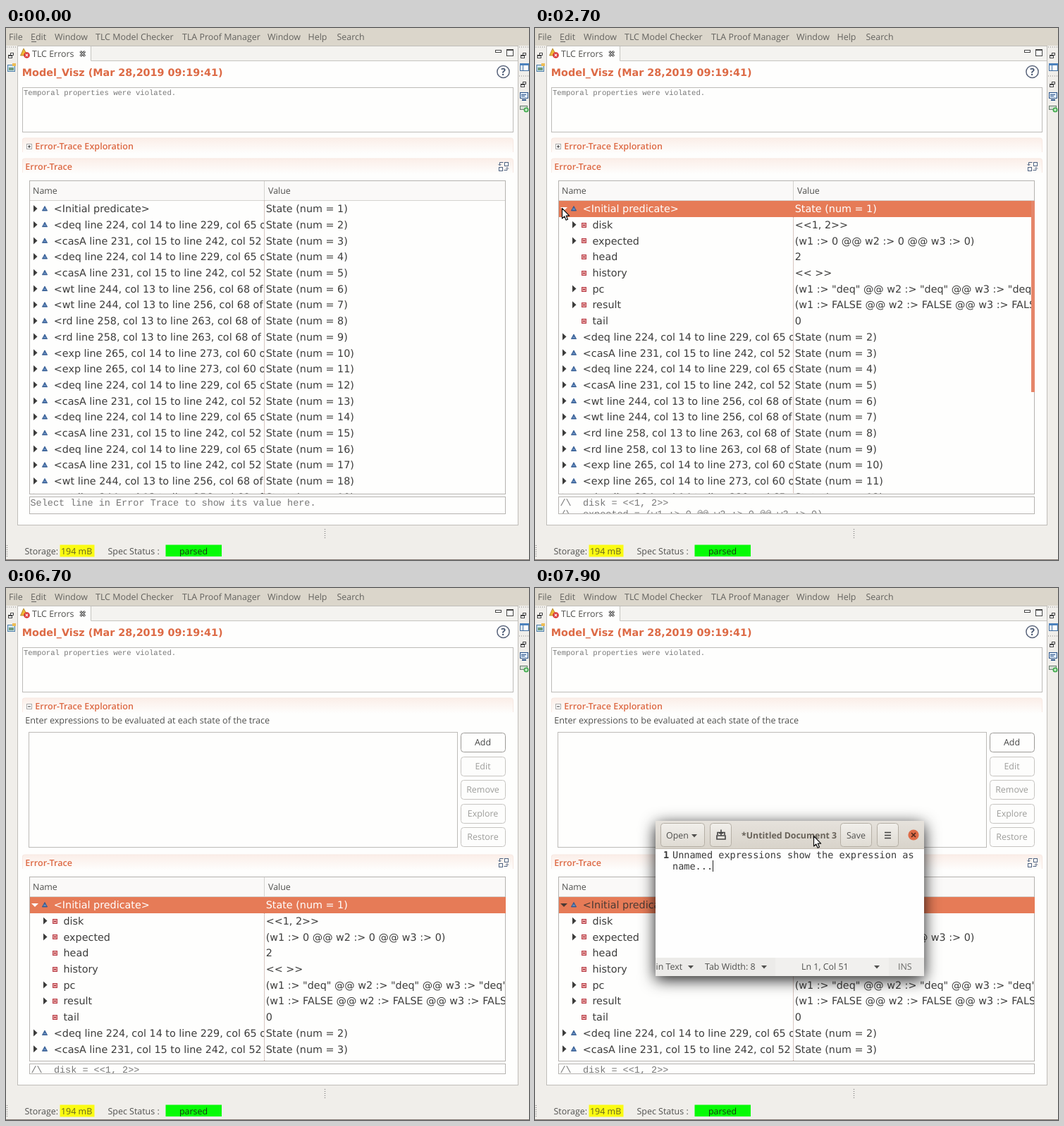
Recreate the animation shown at these times as an HTML page. Size 742 by 754 pixels, loop 8 s.

```html
<!DOCTYPE html>
<html lang="en">
<head>
<meta charset="utf-8">
<title>Error trace</title>
<style>
html, body { margin: 0; width: 742px; height: 754px; overflow: hidden; background: #f0eeea; }
svg { display: block; }
text { text-rendering: geometricPrecision; white-space: pre; }
.ui { font: 12.45px "Open Sans", "Noto Sans", sans-serif; fill: #50504e; }
.head { font-size: 12.6px; font-weight: 600; }
.tree { font: 14.35px "DejaVu Sans", sans-serif; fill: #3c3c3b; }
.mono { font: 13.5px "Liberation Mono", monospace; fill: #777; }
.doc { font: 13.55px "DejaVu Sans Mono", monospace; fill: #3a3a3a; }
.bold { font-weight: 700; }
</style>
</head>
<body>
<svg id="stage" width="742" height="754" viewBox="0 0 742 754">
  <defs>
    <linearGradient id="band" x2="0" y2="1"><stop stop-color="#fbeee8"/><stop offset="1" stop-color="#fefefd"/></linearGradient>
    <linearGradient id="bar" x2="0" y2="1"><stop stop-color="#e6e2dc"/><stop offset="1" stop-color="#d8d3ca"/></linearGradient>
    <linearGradient id="btn" x2="0" y2="1"><stop stop-color="#f1efeb"/><stop offset="1" stop-color="#dfdbd3"/></linearGradient>
    <filter id="shadow" x="-20%" y="-30%" width="140%" height="160%">
      <feDropShadow dx="0" dy="5" stdDeviation="11" flood-color="#000" flood-opacity=".9"/>
    </filter>
    <clipPath id="names"><rect x="34" y="200" width="332" height="500"/></clipPath>
    <clipPath id="values"><rect x="366" y="200" width="342" height="500"/></clipPath>
    <clipPath id="pane"><rect x="0" y="0" width="381" height="220"/></clipPath>
  </defs>
  <g id="base"></g>
  <g id="scene"></g>
</svg>
<script>
const LOOP = 8000, STEP = 100, ROW = 22.7;
const RED = '#dd6a45', SEL = '#e67b57', DARK = '#3c3c3b';

const esc = s => s.replace(/&/g, '&amp;').replace(/</g, '&lt;');
const text = (x, y, s, cls = 'ui', more = '') => `<text x="${x}" y="${y}" class="${cls}" ${more}>${esc(s)}</text>`;
const rect = (x, y, w, h, fill, more = '') => `<rect x="${x}" y="${y}" width="${w}" height="${h}" fill="${fill}" ${more}/>`;
const frame = (x, y, w, h, fill, line, r = 0) => rect(x + .5, y + .5, w - 1, h - 1, fill, `stroke="${line}" rx="${r}"`);
const path = (d, fill, more = '') => `<path d="${d}" fill="${fill}" ${more}/>`;
const line = (d, color, w = 1, more = '') => path(d, 'none', `stroke="${color}" stroke-width="${w}" ${more}`);
const at = (x, y, s) => `<g transform="translate(${x} ${y})">${s}</g>`;
const tint = c => `style="fill:${c}"`;
const mid = 'text-anchor="middle"';
const down = (x, y) => path(`M${x - 4} ${y - 2}h8l-4 4.5z`, '#50504e');

function restore(x, y) {
  return at(x, y, frame(-1, -4, 5, 4, '#fff', '#444') + frame(-4, -1, 6, 5, '#fff', '#444') + rect(-4, -1, 6, 2, '#444'));
}

function chrome() {
  const menu = [[4, 'File'], [35, 'Edit'], [69, 'Window'], [127, 'TLC Model Checker'],
    [250, 'TLA Proof Manager'], [371, 'Window'], [428.5, 'Help'], [469.5, 'Search']];
  const dots = 'stroke-dasharray="1 2"';
  return rect(0, 0, 742, 754, '#f0eeea') + rect(0, 0, 742, 25, '#dbd6cb')
    + menu.map(([x, s]) => text(x, 17, s, 'ui', tint('#63625e'))).join('')
    + line('M36 19.5h7', '#63625e')
    + frame(16, 25, 711, 680, '#fefefd', '#bfbdb9')
    + rect(121, 26, 605, 20, '#f4f3f0') + line('M120.5 26v20.5H726', '#c6c4c0')
    // tab
    + path('M25 29l5.5 10h-10z', '#f0b93a', 'stroke="#a87a1c" stroke-width=".8"')
    + '<circle cx="29.5" cy="38.5" r="4.3" fill="#d83232"/>' + line('M27.7 36.7l3.6 3.6m0-3.6l-3.6 3.6', '#fff', 1.2)
    + text(37, 40.5, 'TLC Errors')
    + line('M105.5 33l6.5 7m0-7l-6.5 7', '#444', 3.2) + line('M105.5 33l6.5 7m0-7l-6.5 7', '#fff', 1)
    + frame(694, 31, 9, 4, '#fff', '#444') + frame(710, 30, 10, 10, '#fff', '#444') + rect(710, 30, 10, 2, '#444')
    // view heading
    + text(22.8, 68, 'Model_Visz (Mar 28,2019 09:19:41)', 'tree bold', tint(RED))
    + '<circle cx="705.5" cy="62" r="8.6" fill="#fff" stroke="#59647a" stroke-width="1.5"/>'
    + text(705.5, 66.8, '?', 'ui bold', `${mid} style="fill:#44546f;font-size:14px"`)
    + frame(23, 84, 697, 64, '#fefefd', '#bdbbb8')
    + text(25, 95, 'Temporal properties were violated.', 'mono', 'style="font-size:10.6px"')
    // side strips
    + line('M1 27h14M728 27h14M728 68h14', '#888', 1, dots)
    + restore(7, 39) + restore(734, 39) + restore(734, 80)
    + frame(2, 52, 11, 10, '#cfe3f2', '#4d7fa8') + rect(4, 56, 7, 4, '#6d9a7c') + path('M9 50h5v4h-5z', '#edbd55')
    + frame(729, 50, 13, 11, '#fff', '#3f6ea3') + rect(729, 50, 13, 3, '#4c82bd') + line('M733.5 53v8', '#3f6ea3')
    + frame(729, 91, 12, 9, '#dce8f5', '#2f578c') + line('M731 94.5h7m-7 2h5', '#2f578c') + rect(732, 101, 6, 2, '#2f578c')
    + frame(729, 110, 11, 6, '#d5ddd5', '#6a7d70') + '<circle cx="738" cy="116" r="3.5" fill="#44ad4f"/>' + line('M736 116h4m-2-2v4', '#fff')
    // status line
    + line('M452.5 710v14M1.5 733v16', '#888', 1.4, dots)
    + text(26.5, 746, 'Storage:') + rect(76.5, 732.5, 49, 17, '#fbfb12') + text(78, 746, '194 mB', 'ui', tint('#66661e'))
    + text(144.5, 746, 'Spec Status :') + rect(226.5, 732.5, 79.5, 16.5, '#06fb06') + text(266, 746, 'parsed', 'ui', `${mid} ${tint('#123c12')}`)
    + rect(0, 753, 742, 1, '#857a75');
}

function section(x, y, title, color) {
  return rect(23, y - 11, 696, 22, 'url(#band)', 'rx="3"') + line(`M23.5 ${y + 9}v-17q0-3 3-3h690q3 0 3 3v17`, '#f7e9e3')
    + text(x, y + 4.5, title, 'ui head', tint(color));
}

function exploration(open, hover) {
  const sign = frame(29, 164, 8, 8, '#fff', '#aaa') + line('M31 168h4' + (open ? '' : 'm-2-2v4'), '#333');
  return section(41.3, 167, 'Error-Trace Exploration', hover ? '#eeab94' : RED) + sign;
}

function form(over) {
  const names = ['Add', 'Edit', 'Remove', 'Explore', 'Restore'];
  return text(27.2, 192, 'Enter expressions to be evaluated at each state of the trace', 'ui', 'style="font-size:12.62px"')
    + frame(32, 204, 609, 164, '#fefefd', '#bdbbb8')
    + names.map((s, i) => {
      const y = Math.round(205 + i * 33.5);
      return frame(645, y, 64, 28, i ? '#fdfdfc' : over ? '#f3f2f0' : '#fefefd', i ? '#c6c4c1' : '#9c9a97', 4)
        + text(676.5, y + 18, s, 'ui', `${mid} ${tint(i ? '#9d9d9a' : '#444')}`);
    }).join('');
}

const SPAN = {
  deq: 'line 224, col 14 to line 229, col 65', casA: 'line 231, col 15 to line 242, col 52',
  wt: 'line 244, col 13 to line 256, col 68', rd: 'line 258, col 13 to line 263, col 68',
  exp: 'line 265, col 14 to line 273, col 60'
};
const STEPS = 'deq casA deq casA wt wt rd rd exp exp deq casA deq casA deq casA wt wt'.split(' ');
const VARS = [
  ['disk', '<<1, 2>>', 1], ['expected', '(w1 :> 0 @@ w2 :> 0 @@ w3 :> 0)', 1], ['head', '2'], ['history', '<< >>'],
  ['pc', '(w1 :> "deq" @@ w2 :> "deq" @@ w3 :> "deq")', 1],
  ['result', '(w1 :> FALSE @@ w2 :> FALSE @@ w3 :> FALSE)', 1], ['tail', '0']
];
const STATES = [['<Initial predicate>', 'State (num = 1)', 1],
  ...STEPS.map((s, i) => [`<${s} ${SPAN[s]} of module>`, `State (num = ${i + 2})`, 1])];

function row([name, value, more], i, child, selected, open, ink) {
  const y = 256 + i * ROW, x = child ? 14 : 0, c = selected ? ink : DARK;
  const arrow = open ? `M36 ${y - 2}h10l-5 5z` : `M${39 + x} ${y - 5}l5.5 5l-5.5 5z`;
  const icon = child
    ? frame(66, Math.round(y) - 3, 7, 7, '#e9a0a0', '#b63d48') + rect(68, Math.round(y), 3, 1, '#8e1f2b')
    : path(`M55 ${y - 3.5}l3.600 6.500h-7.200z`, '#3f6aa5', 'stroke="#2d5488" stroke-width=".8"') + line(`M53.300 ${y + .8}h3.400`, '#a9c0dd', .8);
  return (selected ? rect(34, 245, 675, 23, SEL) : '')
    + `<g clip-path="url(#names)">${more ? path(arrow, c) : ''}${icon}${text(child ? 81.5 : 67.8, y + 5.2, name, 'tree', tint(c))}</g>`
    + `<g clip-path="url(#values)">${text(368.700, y + 5.2, value, 'tree', tint(c))}</g>`;
}

function swap(x, y) {
  const c = '#4d617f';
  return at(x, y, frame(2, -6, 6, 6, '#fff', c) + frame(-6, 1, 6, 6, '#fff', c)
    + line('M.5 -5.500h-5v4m-2-1.500l2 2l2-2M1.500 5.500h4.500v-3m-2 1l2-2l2 2', c));
}

function trace(t, wide) {
  const dy = wide ? 193 : 0, bottom = (wide ? 671 : 661) - dy;
  const selected = t >= 2000, open = t >= 2400;
  const ink = t >= 6800 ? '#4a3a34' : '#fff';
  const list = open ? [STATES[0], ...VARS, ...STATES.slice(1)] : STATES;
  const count = wide ? 10 : 19;
  const rows = list.slice(0, count).map((r, i) => row(r, i, open && i > 0 && i < 8, selected && !i, open && !i, ink)).join('');
  const thumb = t < 700 || t >= 4700 ? 0 : wide ? 84 : t >= 2600 ? 271 : 361;
  const top = bottom + 3, h = 688 - dy - top;
  const pane = selected
    ? text(35.5, top + 13, '/\\  disk = <<1, 2>>', 'mono') + text(35.5, top + 29, '/\\  expected = (w1 :> 0 @@ w2 :> 0 @@ w3 :> 0)', 'mono')
    : text(34.500, top + 13, 'Select line in Error Trace to show its value here.', 'mono');
  const clip = (id, y, hh, s) => `<clipPath id="${id}"><rect x="33" y="${y}" width="676" height="${hh}"/></clipPath><g clip-path="url(#${id})">${s}</g>`;
  return at(0, dy, section(27.300, 196, 'Error-Trace', RED) + swap(705, 196)
    + frame(33, 216, 676, bottom - 216, '#fefefd', '#b5b3b0')
    + rect(34, 217, 674, 28, '#faf9f8') + line('M34 244.500H708M366.500 217v28', '#d5d3d0')
    + text(38, 234.500, 'Name') + text(372, 234.500, 'Value')
    + clip('grid', 217, bottom - 218, rows
      + line(`M366.500 ${selected ? 268 : 245}V${bottom}`, '#b08c82', 1, 'stroke-dasharray="1 1"')
      + (thumb ? rect(704, 245, 5, thumb, '#e5866a') : ''))
    + frame(33, top, 676, h + 1, '#fefefd', '#b5b3b0')
    + clip('info', top + 1, h - 1, pane + (selected && t < 2600 ? rect(704, top + 1, 5, 13, '#e5866a') : '')));
}

function editor(x, y, caret) {
  const key = (kx, w) => frame(kx, 3, w, 34, 'url(#btn)', '#b5afa5', 4);
  const body = rect(0, 0, 381, 220, '#fefefe') + rect(0, 0, 381, 40, 'url(#bar)') + line('M0 39.500h381', '#c5bfb5')
    + key(7, 63) + text(15, 24.500, 'Open') + down(55, 21)
    + key(77, 31) + line('M88 20v-3.500h10v3.500M87 21h12v5h-12zM93 12.500v8m-3-3h6', '#444', 1.6)
    + text(122, 24.500, '*Untitled Document 3', 'ui bold', 'style="font-size:12.35px;fill:#686259"')
    + key(262, 45) + text(284.500, 24.500, 'Save', 'ui', mid)
    + key(314, 31) + line('M325 16.500h9m-9 4h9m-9 4h9', '#3f3f3f', 1.7)
    + '<circle cx="366" cy="20" r="7.600" fill="#df6c48"/>' + line('M363 17l6 6m0-6l-6 6', '#54291c', 1.7)
    + text(11, 53, '1', 'doc bold')
    + text(24, 53, 'Unnamed expressions show the expression as', 'doc') + text(24, 69, 'name...', 'doc')
    + (caret ? rect(81, 56, 1, 16, '#222') : '')
    + rect(0, 194, 381, 26, '#f1f0ee') + rect(0, 194, 170, 26, '#ecebe9') + rect(331, 194, 50, 26, '#ecebe9')
    + text(.5, 210.500, 'in Text') + down(50, 207) + text(70, 210.500, 'Tab Width: 8') + down(154, 207)
    + text(207, 210.500, 'Ln 1, Col 51') + down(314, 207) + text(344, 210.500, 'INS', 'ui', tint('#6b6b69'));
  return at(x, y, `<path d="M0 220V6q0-6 6-6h369q6 0 6 6v214z" fill="#fff" filter="url(#shadow)"/><g clip-path="url(#pane)">${body}</g>`);
}

const ink = 'stroke="#111" stroke-width="1.2" stroke-linejoin="round"';
const POINTERS = {
  arrow: path('M.5 .5v14.500l3.300-3l2.300 5.300l2.400-1l-2.300-5.200h4.500z', '#fff', ink),
  hand: path('M-2.500 0q1.600-1.600 2.700 .3v4.500h5q2.600 .4 2.600 2.700l-.6 4.500l-1.600 2.500h-7l-4.400-5.500q-.4-2 1.600-1.500l1.700 1.400z', '#fff', ink),
  fist: path('M-5 3q0-2.500 2.600-2.200q1-2.200 3.200-.6q2-1.500 3.300 .6q3-.4 3 2.600v3.500l-2 4.600h-8l-4-5q-.7-2.500 1.900-2.200z', '#fff', ink)
};

const POINTER_PATH = [[600, 420, 729], [1400, 72, 300], [1800, 40, 262], [2100, 38, 255], [3100, 38, 255],
  [3600, 95, 180], [3700, 95, 180], [3900, 112, 167], [4500, 112, 167], [4700, 125, 166], [4800, 125, 166],
  [5000, 449, 225], [5200, 560, 227], [5700, 672, 215], [6000, 677, 212], [6700, 677, 212]];
const WINDOW_PATH = [[6800, 670, -70], [7300, 250, 266], [7500, 178, 333], [7700, 171, 330], [8000, 171, 330]];

function along(keys, t) {
  const i = Math.max(1, keys.findIndex(k => k[0] >= t));
  const [t0, x0, y0] = keys[i - 1], [t1, x1, y1] = keys[i];
  const p = (t - t0) / (t1 - t0);
  return [x0 + (x1 - x0) * p, y0 + (y1 - y0) * p];
}

function pointer(t) {
  if (t < 600 || (t >= 6700 && t < 6800)) return '';
  if (t < 6700) return at(...along(POINTER_PATH, t), POINTERS[t >= 3600 && t < 4600 ? 'hand' : 'arrow']);
  if (t >= 7900) return at(395, 351, POINTERS.arrow);
  const [x, y] = along(WINDOW_PATH, t);
  return at(x + 240, y + 2, POINTERS.fist);
}

function scene(t) {
  const wide = t >= 4300;
  return exploration(wide, t >= 3600 && t < 4600)
    + (wide ? form(t >= 5700 && t < 6700) : '') + trace(t, wide)
    + (t >= 6800 ? editor(...along(WINDOW_PATH, t), t >= 7900) : '') + pointer(t);
}

const layer = document.getElementById('scene');
document.getElementById('base').innerHTML = chrome();
let shown = -1;
function draw(now) {
  const t = Math.floor(now % LOOP / STEP) * STEP;
  if (t !== shown) layer.innerHTML = scene(shown = t);
  requestAnimationFrame(draw);
}
draw(0);
</script>
</body>
</html>
```
